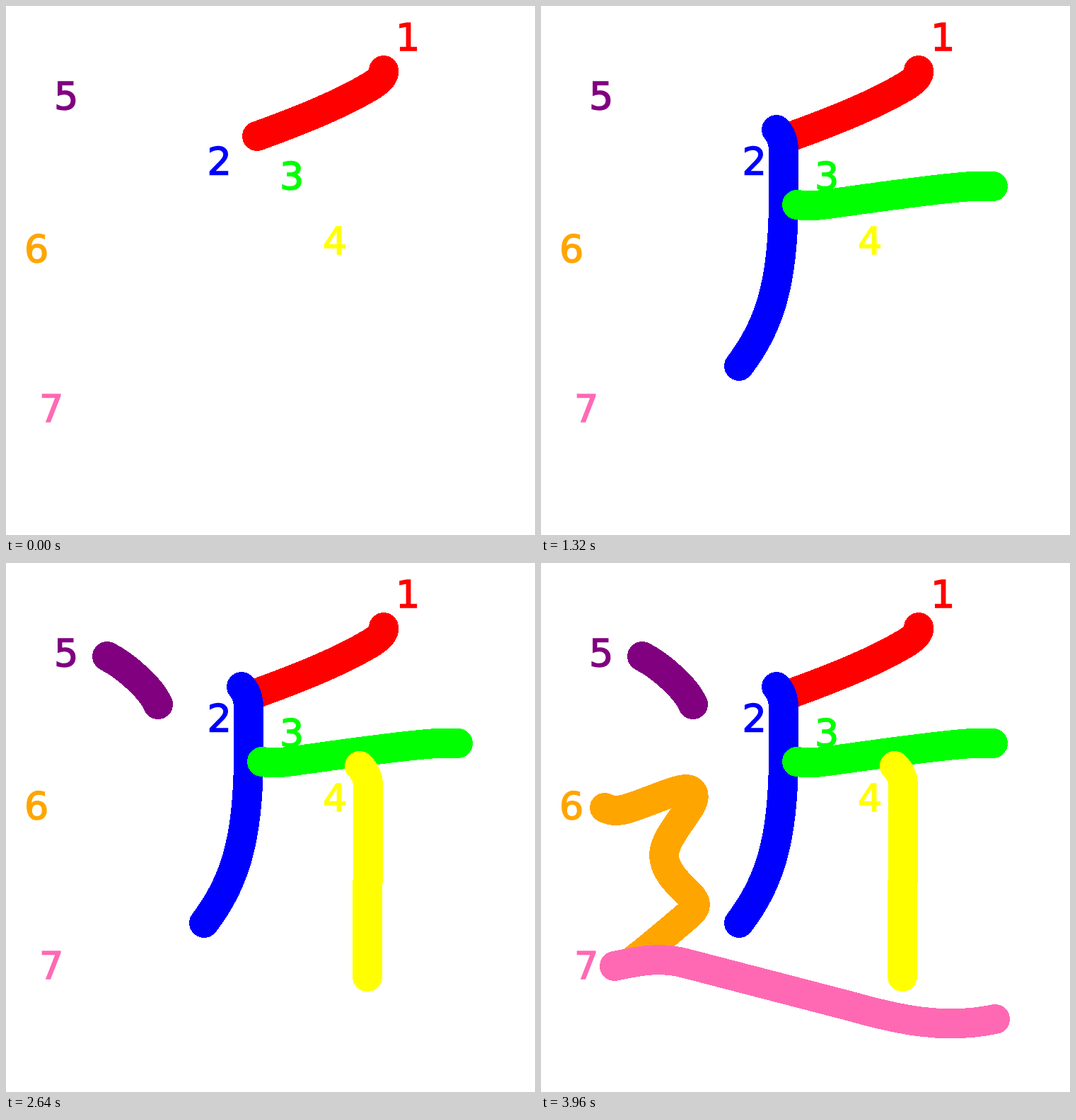
An HTML page that plays this animation: 748x748 px, repeating every 4620 ms.

```html
<!DOCTYPE html>
<html lang="en">
<head>
<meta charset="utf-8">
<title>Stroke order</title>
<style>
  html, body { margin: 0; width: 100%; height: 100%; overflow: hidden; background: #fff; }
  svg { display: block; width: 748px; height: 748px; }
  path { fill: none; stroke-width: 42; stroke-linecap: round; stroke-linejoin: round; shape-rendering: crispEdges; }
  text { font: 54px "DejaVu Sans", Verdana, sans-serif; stroke-width: 1.5; }
</style>
</head>
<body>
<svg id="stage" viewBox="0 0 748 748"></svg>
<script>
const STEP = 660;

// colour, label x, label baseline, brush path
const strokes = [
  ['red', 551, 62.5, 'M534,91C535,98 530,104 518,112C474,138.5 420,160.5 355,184'],
  ['blue', 284.5, 237.5, 'M333,175C340,183 343,193 343,205V272C343,395 321.5,455 280,509'],
  ['lime', 387, 258.5, 'M362,281C375,283 388,282.5 402,280.5C440,275.5 560,257.5 610,255C620,254.6 630,254.8 639,255'],
  ['yellow', 448, 350.5, 'M500,287C508,295 512,303 512,314V449L511,452V585'],
  ['purple', 68, 145.5, 'M143,132C169,145 205,177 215,200'],
  ['orange', 26, 361.5, 'M90,346C99,351 109,351.5 123,347C143,341 170,329 193,322C213,316 221,325 212,342' +
    'C203,360 174,390 174,413C174,436 196,455 210,469C221,480 221,487 208,498C188,515 153,545 133,560'],
  ['hotpink', 47, 587.5, 'M104,570C140,562 170,557 204,566L435,626C505,646 570,660 642,645']
];

const stage = document.getElementById('stage');

function add(tag, attrs, text = '') {
  const el = document.createElementNS(stage.namespaceURI, tag);
  for (const key in attrs) el.setAttribute(key, attrs[key]);
  el.textContent = text;
  return stage.appendChild(el);
}

strokes.forEach(([color, x, y], i) => add('text', { x, y, fill: color, stroke: color }, i + 1));
const paths = strokes.map(([stroke, , , d]) => add('path', { d, stroke }));

function draw(time) {
  const last = Math.floor(time / STEP) % paths.length;
  paths.forEach((path, i) => { path.style.visibility = i <= last ? 'visible' : 'hidden'; });
}

const start = performance.now();
function tick() {
  draw(performance.now() - start);
  requestAnimationFrame(tick);
}
tick();
</script>
</body>
</html>
```
